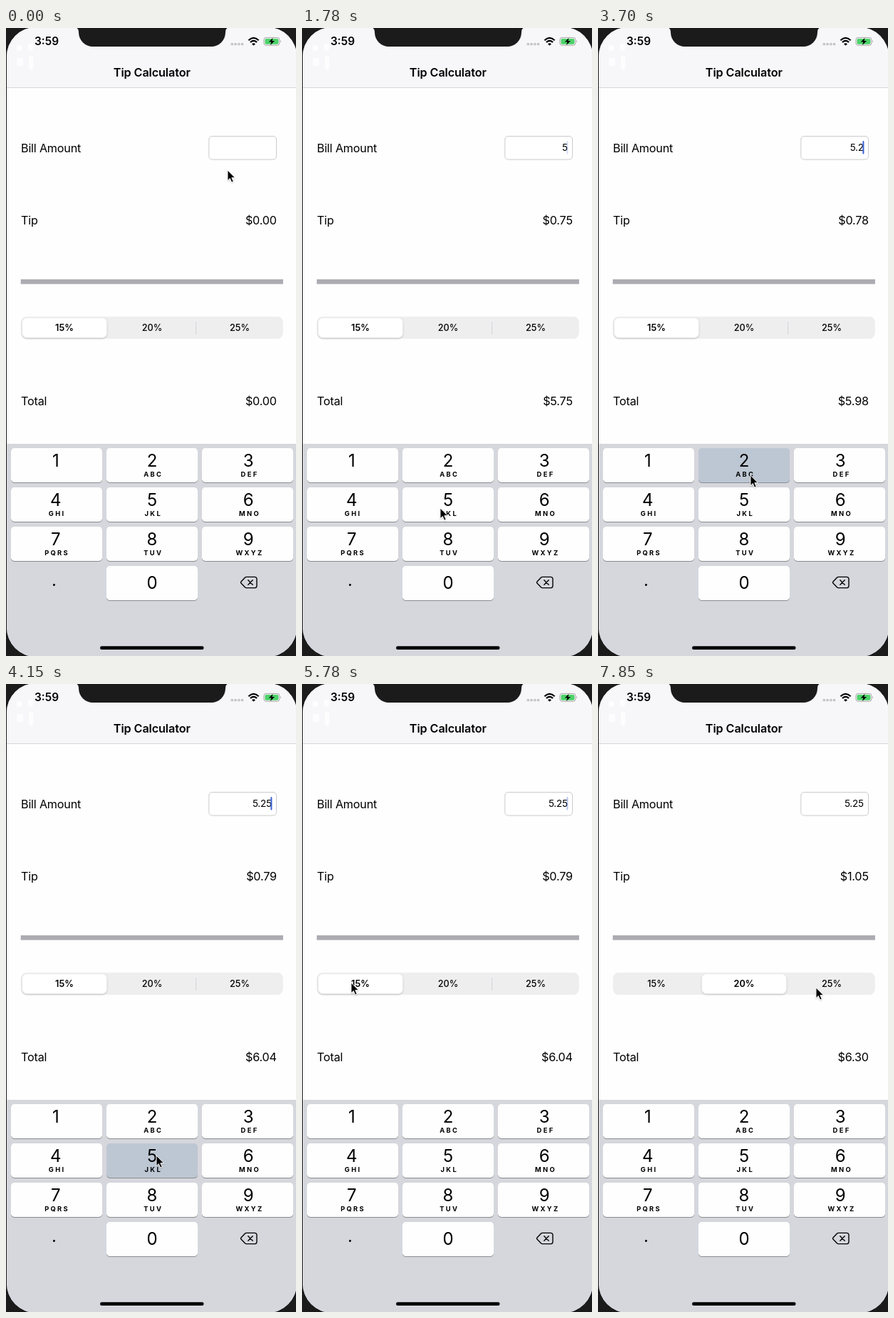
Recreate the animation shown at these times as an HTML page. Size 407 by 879 pixels, loop 8000 ms.

```html
<!DOCTYPE html>
<html lang="en">
<head>
<meta charset="utf-8">
<title>Tip Calculator</title>
<style>
  html, body { margin: 0; width: 100%; height: 100%; overflow: hidden; background: #1b1b1c; }
  svg { display: block; width: 407px; height: 879px; }
  text { font-family: Inter, "Open Sans", sans-serif; fill: #000; }
  .label { font-size: 16.2px; letter-spacing: -.2px; }
  .title { font-size: 16.2px; font-weight: 600; letter-spacing: -.1px; }
  .clock { font-size: 15.4px; font-weight: 600; }
  .bill { font-size: 13.5px; letter-spacing: -.25px; }
  .segment { font-size: 12.7px; font-weight: 500; }
  .digit { font-size: 24px; }
  .letters { font-size: 9.4px; font-weight: 700; letter-spacing: 2.3px; }
  .mid { text-anchor: middle; }
  .end { text-anchor: end; }
</style>
</head>
<body>
<svg viewBox="0 0 407 879">
  <defs>
    <clipPath id="screen"><rect x="1" y="-1" width="407" height="881" rx="41"/></clipPath>
    <filter id="soft" x="-20%" y="-30%" width="140%" height="170%">
      <feDropShadow dx="0" dy="1.2" stdDeviation="1.3" flood-opacity=".2"/>
    </filter>
  </defs>

  <g clip-path="url(#screen)">
    <rect width="408" height="879" fill="#fefefe"/>

    <rect width="408" height="83" fill="#f7f6f8"/>
    <g fill="#fff" opacity=".8">
      <rect x="15" y="24" width="8" height="8" rx="2"/>
      <rect x="31" y="22" width="7" height="9" rx="2"/>
      <rect x="15" y="42" width="9" height="11" rx="2"/>
      <rect x="32" y="39" width="6" height="20" rx="2"/>
    </g>
    <rect y="83" width="408" height="1" fill="#d6d6d8"/>
    <text class="title mid" x="204.8" y="67.5">Tip Calculator</text>
    <text class="clock mid" x="57" y="24">3:59</text>

    <g id="signal" fill="#c5c5c7"></g>
    <g fill="none" stroke="#000" stroke-width="2.2">
      <path d="M340.4 17.2Q347.5 10.5 354.6 17.2"/>
      <path d="M342.9 20Q347.5 15.8 352.1 20"/>
    </g>
    <path d="M345 22.2Q347.5 20.2 350 22.2L347.5 24.8Z"/>
    <rect x="361.9" y="13.4" width="22" height="10.8" rx="3.2" fill="none" stroke="#a4a6a5"/>
    <rect x="363.4" y="14.9" width="19" height="7.8" rx="1.8" fill="#4cd268"/>
    <path d="M385.2 17q1.7 1.8 0 3.7z" fill="#a4a6a5"/>
    <path d="M374.6 13.7L368.8 19.6H372.4L371 24L377 18H373.4Z"/>

    <text class="label" x="21" y="173.5">Bill Amount</text>
    <text class="label" x="21" y="274.8">Tip</text>
    <text class="label" x="21" y="527.6">Total</text>
    <rect x="284.8" y="151.5" width="94.7" height="32.6" rx="4.5" fill="#fff" stroke="#cbcbcd"/>
    <text class="bill end" id="bill" x="372.7" y="172.4"></text>
    <rect id="caret" x="371.4" y="158" width="2" height="18.5" rx="1" fill="#3a62d8"/>
    <text class="label end" id="tip" x="379.8" y="274.8"></text>
    <text class="label end" id="total" x="379.8" y="527.6"></text>
    <rect x="20.7" y="351.7" width="368.2" height="6.7" fill="#acabb1"/>

    <rect x="21" y="404" width="367.8" height="31" rx="8" fill="#eeeeef"/>
    <rect id="divider" x="266" y="411" width="1" height="18" fill="#d6d6d9"/>
    <rect id="thumb" x="22.7" y="405.8" width="118.8" height="27.6" rx="6.5"
          fill="#fff" stroke="#e5e5e7" stroke-width=".5" filter="url(#soft)"/>
    <g id="segments"></g>

    <rect y="582" width="408" height="298" fill="#d6d7dd"/>
    <g id="keys"></g>
    <g transform="translate(-.6 0)" fill="none" stroke="#000" stroke-width="1.4"
       stroke-linejoin="round" stroke-linecap="round">
      <path d="M338 768.4H349.4Q352.6 768.4 352.6 771.6V780.4Q352.6 783.6 349.4 783.6H338Q336.8 783.6 336 782.8L330.5 777Q329.7 776 330.5 775L336 769.2Q336.8 768.4 338 768.4Z"/>
      <path d="M340.4 772.8L346.8 779.2M346.8 772.8L340.4 779.2"/>
    </g>
    <rect x="132" y="865.2" width="145.6" height="4.9" rx="2.45"/>
  </g>

  <path d="M96 -1Q102 -.5 102 6A20 20 0 0 0 122 26H288A20 20 0 0 0 308 6Q308 -.5 314 -1Z" fill="#1b1b1c"/>
  <path id="pointer" d="M0 0V14.6L3.3 11.5L5.7 17.1L8.2 16L5.8 10.6H10.4Z"
        stroke="#fff" stroke-width=".9" filter="url(#soft)"/>
</svg>

<script>
const LOOP = 8000, STEP = LOOP / 54;
const $ = id => document.getElementById(id);

function add(parent, tag, attrs, content = '') {
  const el = document.createElementNS('http://www.w3.org/2000/svg', tag);
  for (const name in attrs) el.setAttribute(name, attrs[name]);
  el.textContent = content;
  parent.append(el);
  return el;
}

// Static repeats
for (let i = 0; i < 4; i++) add($('signal'), 'circle', { cx: 317.3 + 4.77 * i, cy: 22.6, r: 1.9 });

const segments = [15, 20, 25].map((rate, i) =>
  add($('segments'), 'text', { class: 'segment mid', x: 82 + 123 * i, y: 424.4 }, rate + '%'));

const keys = {};
function addKey(digit, col, row, letters) {
  const x = 7 + 134 * col, y = 588 + 55 * row, mid = 70.3 + 135.2 * col;
  const box = { x, width: 128, height: 48, rx: 4.8 };
  add($('keys'), 'rect', { ...box, y: y + 1, fill: '#898b90' });
  keys[digit] = add($('keys'), 'rect', { ...box, y });
  add($('keys'), 'text', { class: 'digit mid', x: mid - .5, y: y + (digit ? 25.7 : 31.7) }, digit);
  add($('keys'), 'text', { class: 'letters mid', x: mid + 1.3, y: y + 39.8 }, letters);
}
' ABC DEF GHI JKL MNO PQRS TUV WXYZ'.split(' ')
  .forEach((letters, i) => addKey(i + 1, i % 3, Math.floor(i / 3), letters));
addKey(0, 1, 3, '');
add($('keys'), 'text', { class: 'digit mid', x: 67.4, y: 781 }, '.');

// Pointer stops: each move eases from the previous stop
const MOVES = [
  { from: 0, to: 0, x: 311, y: 199 },
  { from: 0, to: 1040, x: 194, y: 672 },
  { from: 1780, to: 2370, x: 54, y: 797 },
  { from: 2370, to: 2670, x: 65, y: 774 },
  { from: 2820, to: 2960, x: 89, y: 760 },
  { from: 2960, to: 3700, x: 214, y: 626 },
  { from: 3700, to: 4000, x: 211, y: 660 },
  { from: 4890, to: 5780, x: 69, y: 418 },
  { from: 5780, to: 6520, x: 174, y: 418.5 },
  { from: 6970, to: 7850, x: 306, y: 425 }
];
const TYPED = [
  { at: -800, text: '' },
  { at: 1030, text: '5', key: 5 },
  { at: 2510, text: '5.' },
  { at: 3700, text: '5.2', key: 2 },
  { at: 4060, text: '5.25', key: 5 }
];
const SLIDE = { from: 6720, to: 7260 };

const clamp = v => Math.min(1, Math.max(0, v));
const progress = ({ from, to }, now) => to > from ? clamp((now - from) / (to - from)) : 1;
const easeInOut = p => (1 - Math.cos(Math.PI * p)) / 2;
const easeOut = p => 1 - (1 - p) ** 2;
const money = cents => '$' + (Math.round(cents) / 100).toFixed(2);

function pointerAt(now) {
  let x = 0, y = 0;
  for (const move of MOVES) {
    const p = easeInOut(progress(move, now));
    x += (move.x - x) * p;
    y += (move.y - y) * p;
  }
  return `${x} ${y}`;
}

function caretAlpha(age) {
  const phase = age % 1000;
  return phase < 800 ? clamp((790 - phase) / 200) : clamp((phase - 860) / 140);
}

function draw(time) {
  // The picture advances in even steps; the slack absorbs rounded frame times
  const now = Math.floor((time + 7) / STEP) * STEP % LOOP;
  const entry = TYPED.findLast(e => e.at <= now);
  const age = now - entry.at;
  const slide = easeOut(progress(SLIDE, now));
  const bill = Number(entry.text), rate = slide ? 20 : 15;

  $('bill').textContent = entry.text;
  $('tip').textContent = money(bill * rate);
  $('total').textContent = money(bill * (100 + rate));
  $('caret').setAttribute('opacity', caretAlpha(age));

  for (const digit in keys) {
    const down = age < STEP && entry.key === Number(digit);
    keys[digit].setAttribute('fill', down ? '#bdc7d3' : '#fefefe');
  }

  $('thumb').setAttribute('transform', `translate(${123 * slide} 0)`);
  $('divider').setAttribute('opacity', clamp(2 - 2.5 * slide));
  segments[0].style.fontWeight = slide ? 500 : 600;
  segments[1].style.fontWeight = slide > .5 ? 600 : 500;
  segments[1].style.fill = slide && slide < .5 ? '#333' : '#000';

  $('pointer').setAttribute('transform', `translate(${pointerAt(now)})`);
}

const start = performance.now();
function tick() {
  draw((performance.now() - start) % LOOP);
  requestAnimationFrame(tick);
}
tick();
</script>
</body>
</html>
```
